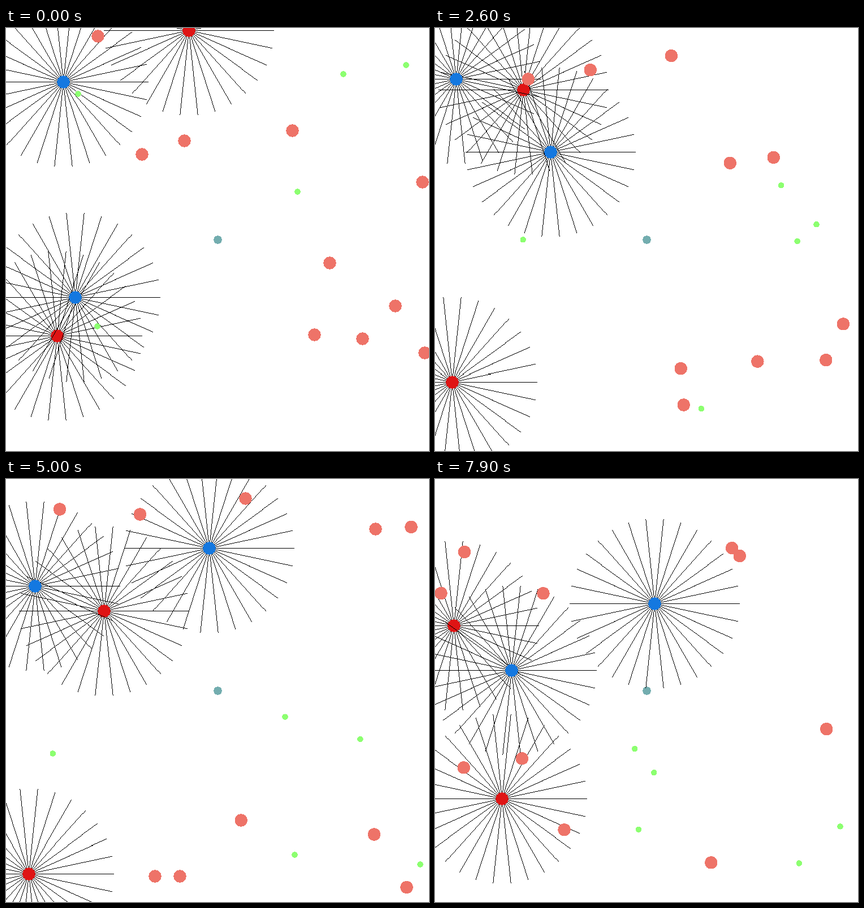
Write a matplotlib script that moves like this. It is 748x748 px and loops after 8000 ms.

```python
import numpy as np
import matplotlib.pyplot as plt
from matplotlib.animation import FuncAnimation
from matplotlib.patches import Circle

SIZE, DPI = 748, 64
FRAMES, STEP, SUB = 80, 100, 8
RED, BLUE = "#df1414", "#1478e0"
SALMON, GREEN, TEAL = "#ee7368", "#8cff70", "#73adaf"
BIG, SMALL = 11, 5
REACH, RAYS = 150, 30
HUB, SHIELD = np.array([374, 374]), 72.5

# Places each star wanders through, at the steps in KEYS
KEYS = [0, 12, 20, 33, 50, 61, 79]
STARS = [
    (RED, [(323, 4), (237, 66), (184, 93), (123, 128), (173, 233), (61, 207), (33, 259)]),
    (RED, [(90, 544), (99, 566), (35, 556), (24, 707), (40, 698), (40, 694), (118, 565)]),
    (BLUE, [(101, 95), (19, 79), (45, 97), (28, 82), (51, 189), (13, 282), (135, 338)]),
    (BLUE, [(122, 476), (138, 362), (169, 210), (245, 229), (359, 122), (336, 149), (388, 220)]),
]

# Start and velocity; everything after that follows from the bounces
BALLS = [
    (162, 14, 9.82, -1.64), (240, 223, -2.91, -5.12), (315, 199, -1.57, -4.82),
    (506, 181, -5.27, 8.9), (572, 415, -5.3, 7.18), (630, 549, -7.34, 4.5),
    (545, 542, 5.61, 1.72), (740, 574, -6.45, 0.58), (736, 272, -0.56, 9.65),
    (688, 491, 7.3, -10.1),
]
SPECKS = [
    (596, 81, 0.6, 7.57), (161, 527, 11.9, 5.6), (707, 65, 5.42, 11.98),
    (515, 289, 11.5, 2.22), (127, 116, -9.56, 4.63),
]
# A caught ball reappears elsewhere: step -> (ball, place)
RESPAWN = {2: (14, (384.6, 262.7)), 60: (9, (189, 318)), 72: (5, (103, 160))}


def simulate():
    """Positions of all balls at every step."""
    state = np.array(BALLS + SPECKS, float)
    pos, vel = state[:, :2], state[:, 2:]
    radius = np.repeat([BIG, SMALL], [len(BALLS), len(SPECKS)])[:, None]
    lo, hi = radius - 1, SIZE + 1 - radius
    track = []
    for step in range(FRAMES):
        if step in RESPAWN:
            ball, place = RESPAWN[step]
            pos[ball] = place
        track.append(pos.copy())
        for _ in range(SUB):
            pos += vel / SUB
            low, high = pos < lo, pos > hi
            vel[low], vel[high] = abs(vel[low]), -abs(vel[high])
            pos[:] = np.where(low, 2 * lo - pos, np.where(high, 2 * hi - pos, pos))

            away = pos - HUB
            dist = np.linalg.norm(away, axis=1, keepdims=True)
            normal = away / dist
            inward = (vel * normal).sum(axis=1, keepdims=True)
            hit = (dist < SHIELD + radius) & (inward < 0)
            vel -= np.where(hit, 2 * inward * normal, 0)
    return track


def burst():
    """One-pixel rays on a transparent square."""
    img = np.zeros((2 * REACH + 1, 2 * REACH + 1, 4))
    for angle in np.arange(RAYS) * 2 * np.pi / RAYS:
        tip = REACH * np.array([np.cos(angle), np.sin(angle)])
        count = int(np.ceil(abs(tip).max())) + 1
        x, y = np.rint(np.outer(tip, np.linspace(0, 1, count))).astype(int) + REACH
        img[y, x, 3] = 1
    return img


fig = plt.figure(figsize=(SIZE / DPI, SIZE / DPI), dpi=DPI, facecolor="white")
ax = fig.add_axes([0, 0, 1, 1])
ax.set_xlim(-0.5, SIZE - 0.5)
ax.set_ylim(SIZE - 0.5, -0.5)
ax.axis("off")


def dot(radius, color, z, center=(0, 0)):
    # Hard edges fill every touched pixel, so draw a little smaller
    return ax.add_patch(Circle(center, radius - 0.4, fc=color, ec="none", lw=0,
                               antialiased=False, zorder=z))


dot(7, TEAL, 1, HUB)
rays_image = burst()
stars = []
for z, (color, places) in enumerate(STARS, start=2):
    rays = ax.imshow(rays_image, aspect="auto", interpolation="nearest",
                     origin="upper", zorder=z)
    stars.append((rays, dot(BIG, color, z + 0.5), np.transpose(places)))

dots = [dot(BIG, SALMON, 10) for _ in BALLS] + [dot(SMALL, GREEN, 11) for _ in SPECKS]
track = simulate()


def update(step):
    half = REACH + 0.5
    for rays, core, (xs, ys) in stars:
        x, y = np.rint([np.interp(step, KEYS, xs), np.interp(step, KEYS, ys)])
        rays.set_extent((x - half, x + half, y + half, y - half))
        core.center = x, y
    for patch, place in zip(dots, track[step]):
        patch.center = place
    return []


anim = FuncAnimation(fig, update, frames=FRAMES, interval=STEP,
                     repeat=True, repeat_delay=0, blit=False)
plt.show()
```
